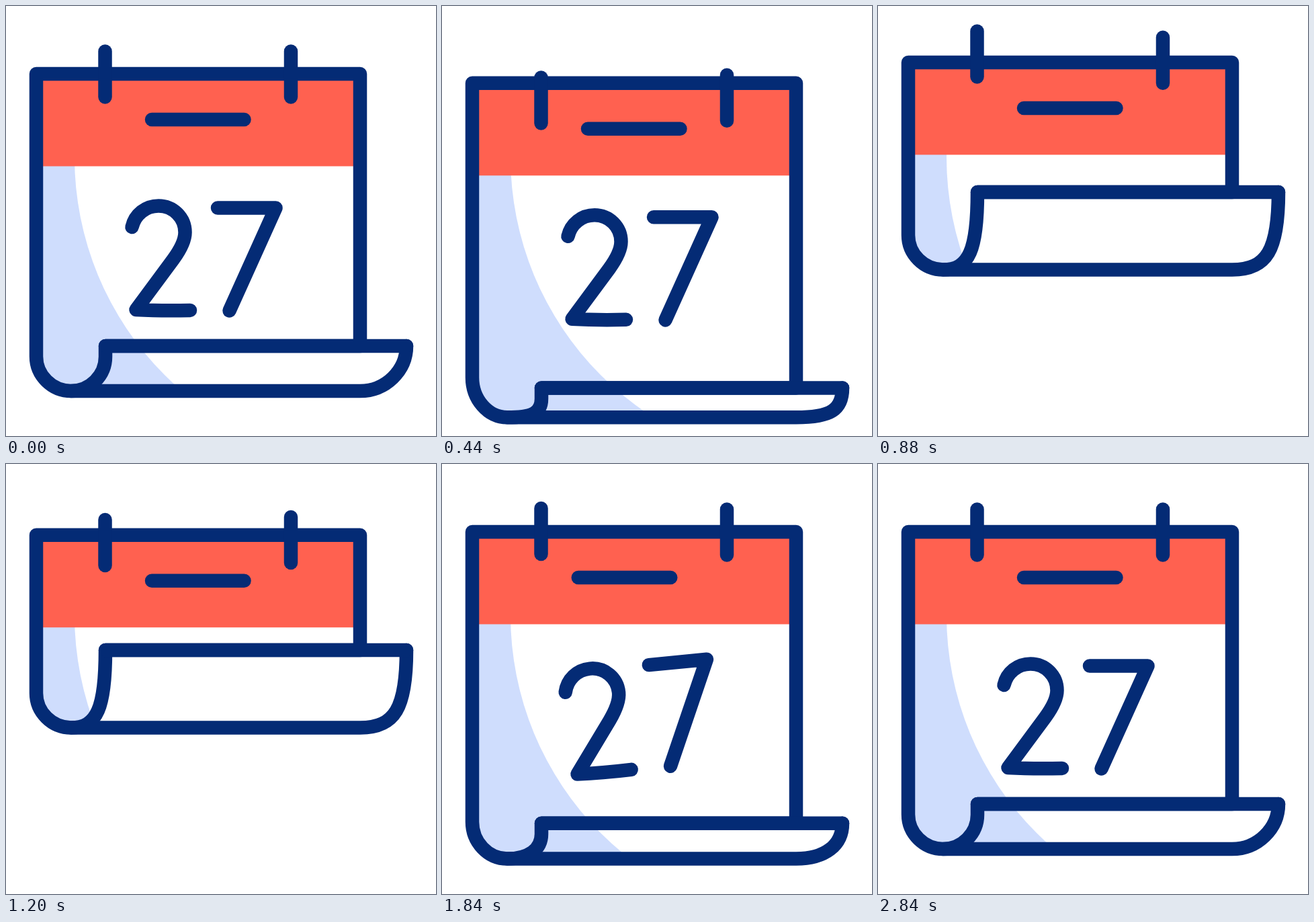
Recreate the animation shown at these times as an HTML page with a canvas. Size 640 px wide and 640 px high, loop 2880 ms.

```html
<!DOCTYPE html>
<html lang="en">
<head>
<meta charset="utf-8">
<title>Calendar</title>
<style>
html, body { margin: 0; width: 100%; height: 100%; overflow: hidden; background: #fff; }
canvas { display: block; width: 640px; height: 640px; }
</style>
</head>
<body>
<canvas id="stage" width="640" height="640"></canvas>
<script>
const LOOP = 2880;
const NAVY = '#042b75', RED = '#ff6150', SHADE = '#cfddfd';
const REST = 573, ROLLED = 392.5;
const ctx = document.getElementById('stage').getContext('2d');

const clamp = x => Math.max(0, Math.min(1, x));
const ease = u => (1 - Math.cos(Math.PI * clamp(u))) / 2;

// Eases from one turning point to the next.
function swing(times, values) {
  return t => {
    let v = values[0];
    for (let i = 1; i < times.length; i++) {
      const u = (t - times[i - 1]) / (times[i] - times[i - 1]);
      v += (values[i] - values[i - 1]) * ease(u);
    }
    return v;
  };
}

const BEATS = [0, 400, 705, 1110, 1505, 1850];
const bodyShift = swing(BEATS, [0, 16, -33, 7, -11, 0]);
const ringShift = swing(BEATS, [0, 39, -46, 17.5, -31, 0]);
const bottomY = swing([0, 385, 790, 1270, 1720, 1990], [REST, 623, ROLLED, ROLLED, 598, REST]);

// The flap grows as the sheet rolls up and flattens when it is stretched.
function flapHeight(bottom) {
  const stretch = bottom - REST;
  return stretch > 0
    ? 67 - 3.7 * Math.sqrt(stretch)
    : 67 + 48.5 * (stretch / (ROLLED - REST)) ** 2.6;
}

const dashShift = t => 361 * ease(clamp((t - 1200) / 760) ** 0.8);

// Damped wobble in degrees.
function tilt(t) {
  const u = clamp((t - 1505) / 1100);
  return 11.5 * (1 - u) ** 2 * Math.sin(u * 2.5 * 2 * Math.PI);
}

const two = new Path2D('M187.5 329C192 310 208 297.5 227 297.5C249 297.5 266.5 315 266.5 337' +
  'C266.5 350 257 366 249 377L193.5 452Q230 454 274 453');
const seven = new Path2D('M315 300.5H401.5L332.5 453.5');

function line(x0, y0, x1, y1) {
  ctx.beginPath();
  ctx.moveTo(x0, y0);
  ctx.lineTo(x1, y1);
  ctx.stroke();
}

function inside(path, paint) {
  ctx.save();
  ctx.clip(path);
  paint();
  ctx.restore();
}

// Shaded area left of one large fixed circle.
function paper() {
  ctx.fillStyle = SHADE;
  ctx.fillRect(0, 0, 640, 640);
  ctx.fillStyle = '#fff';
  ctx.beginPath();
  ctx.arc(561, 225, 459, 0, Math.PI * 2);
  ctx.fill();
}

function draw(t) {
  const dy = bodyShift(t), top = 101 + dy;
  const bottom = bottomY(t), gap = flapHeight(bottom), fold = bottom - gap;
  const k = 0.55 + 0.2 * clamp(Math.abs(bottom - REST) / 40);
  const rollTop = fold + 16 * clamp((81 - gap) / 14);
  const round = 51.5 + Math.max(0, 60 - gap) / 2;

  // Bends a path from (x0, y0) falling to the bottom edge at x1.
  const bend = (p, x0, y0, x1, k) =>
    p.bezierCurveTo(x0, y0 + (bottom - y0) * k, x1 + (x0 - x1) * k, bottom, x1, bottom);
  const roll = p => {
    p.lineTo(148, fold);
    p.lineTo(148, rollTop);
    bend(p, 148, rollTop, 97, k);
  };

  const body = new Path2D();
  body.moveTo(527, fold);
  roll(body);
  body.bezierCurveTo(97 - 52 * 0.55, bottom, 45, bottom - round * 0.45, 45, bottom - round);
  body.lineTo(45, top);
  body.lineTo(527, top);
  body.closePath();

  const flap = new Path2D();
  flap.moveTo(596, fold);
  bend(flap, 596, fold, 527, k);
  flap.lineTo(97, bottom);
  flap.lineTo(527, bottom);
  const flapArea = new Path2D();
  flapArea.moveTo(596, fold);
  roll(flapArea);
  flapArea.lineTo(527, bottom);
  flapArea.bezierCurveTo(527 + 69 * k, bottom, 596, fold + gap * k, 596, fold);

  ctx.fillStyle = '#fff';
  ctx.fillRect(0, 0, 640, 640);
  ctx.strokeStyle = NAVY;
  ctx.lineWidth = 20.5;
  ctx.lineCap = ctx.lineJoin = 'round';

  inside(body, () => {
    paper();
    ctx.fillStyle = RED;
    ctx.fillRect(45, top, 482, 137.5);
    const x = 217 + dashShift(t);
    for (const start of [x, x - 361]) line(start, 169 + dy, start + 137.5, 169 + dy);
    ctx.translate(297, 374 + dy);
    ctx.rotate(tilt(t) * Math.PI / 180);
    ctx.translate(-297, -374);
    ctx.stroke(two);
    ctx.stroke(seven);
  });
  inside(flapArea, paper);

  ctx.stroke(body);
  ctx.stroke(flap);
  line(148, fold, 596, fold);

  const ring = (x, shift) => line(x, 67.5 + shift, x, 135.5 + shift);
  ring(147.5, ringShift(t - 40));
  ring(424, ringShift(t));
}

function frame() {
  draw(performance.now() % LOOP);
  requestAnimationFrame(frame);
}
frame();
</script>
</body>
</html>
```
